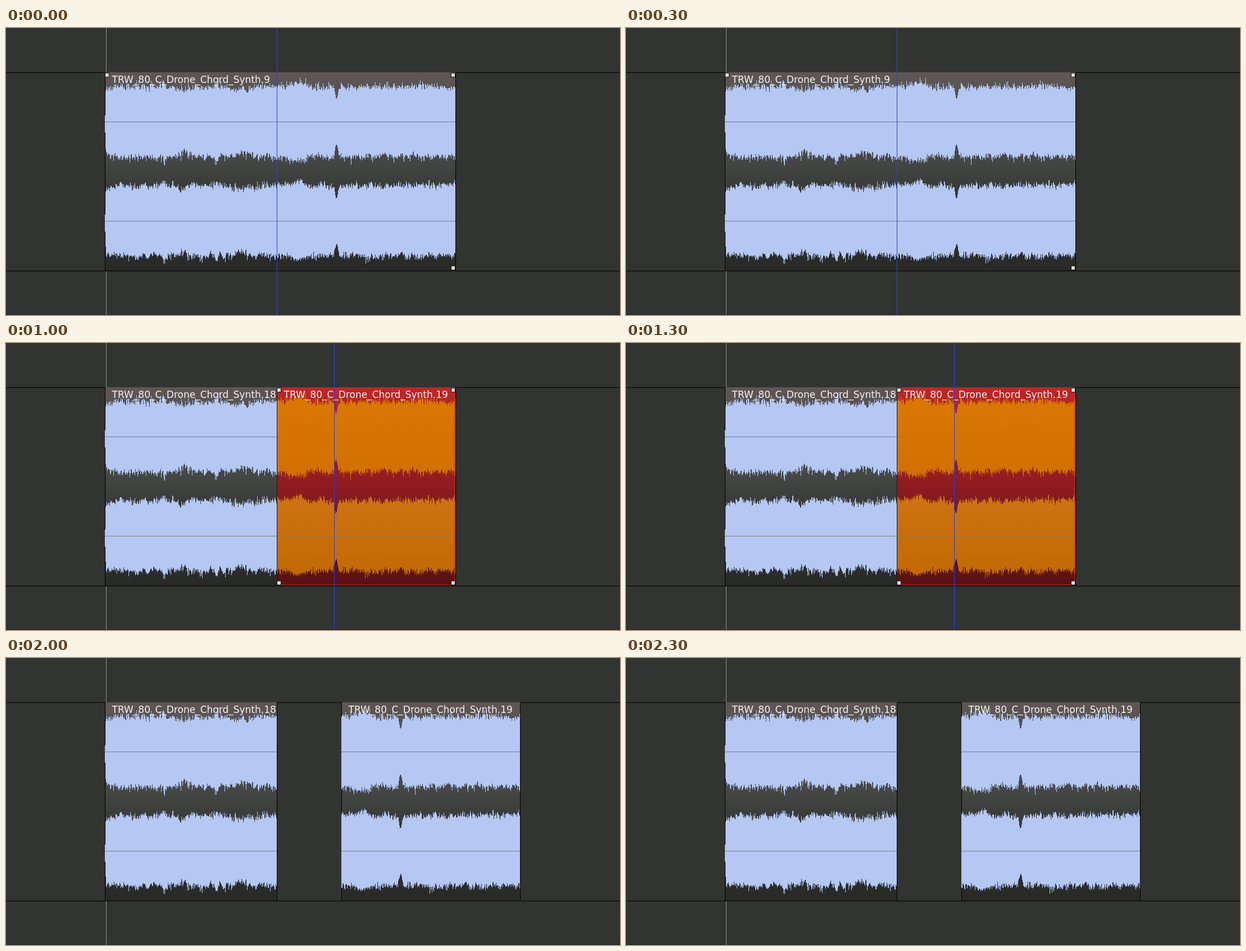
Write an HTML page with a canvas that moves like this. It is 1093x512 px and loops after 2.5 s.

```html
<!DOCTYPE html>
<html lang="en">
<head>
<meta charset="utf-8">
<title>Splitting an audio region</title>
<style>
html, body { margin: 0; width: 100%; height: 100%; overflow: hidden; background: #323431; }
canvas { display: block; }
</style>
</head>
<body>
<canvas id="stage" width="1093" height="512"></canvas>
<script>
const W = 1093, H = 512, TOP = 79, BOTTOM = 433;
const STEP = 500, LENGTH = 627, SPLIT = 307;
const CENTERS = [167, 344];
const ctx = document.getElementById('stage').getContext('2d');

const PLAIN = {
  body: [[0, '#5e5655'], [0.1, '#585453'], [0.42, '#474946'], [0.56, '#3b3d3a'], [1, '#282927']],
  wave: [[0, '#b5c7f3']],
  tip: 'rgba(10, 12, 18, 0.75)',
  axes: ['#6c7a9c', '#7b8079']
};
const PICKED = {
  body: [[0, '#c02626'], [0.43, '#961d21'], [0.57, '#841a1e'], [1, '#581212']],
  wave: [[0, '#db7805'], [0.43, '#d17100'], [0.57, '#ce7213'], [1, '#bf6900']],
  tip: 'rgba(90, 16, 10, 0.6)',
  axes: ['#c66f08', '#a07f42']
};

// Swells and dips of the sound
const BUMPS = [
  { at: 104, size: 9, spread: 3 },
  { at: 140, size: -7, spread: 10 },
  { at: 198, size: 10, spread: 3 },
  { at: 242, size: -6, spread: 24 },
  { at: 342, size: 7, spread: 18 },
  { at: 412, size: -22, spread: 3.5 }
];

function random(n) {
  n = Math.imul(n ^ (n >>> 16), 0x45d9f3b);
  n = Math.imul(n ^ (n >>> 16), 0x45d9f3b);
  return ((n ^ (n >>> 16)) >>> 0) / 4294967296;
}

// Value between -1 and 1, one per position and layer
const noise = (x, layer) => random(x * 64 + layer + 9001) * 2 - 1;

// How far the wave extends from its axis
function reach(x, edge) {
  if (x === 0) return edge % 2 ? 20 : 12;
  const swell = BUMPS.reduce((sum, b) => sum + b.size * Math.exp(-(((x - b.at) / b.spread) ** 2)), 0);
  const rough = 2.5 * noise(x >> 3, edge) + 3 * noise(x >> 1, edge + 8) + 4 * noise(x, edge + 16);
  const spike = Math.max(0, noise(x, edge + 24) - 0.55) * 18;
  const onset = -10 * Math.exp(-x / 7);
  const calm = swell < -10 ? 0.3 : 1;
  return Math.round(63 + swell + onset + calm * (rough + spike));
}

const SOUND = Array.from({ length: LENGTH }, (_, x) => [0, 1, 2, 3].map(edge => reach(x, edge)));

function rect(x, y, w, h, color) {
  ctx.fillStyle = color;
  ctx.fillRect(x, y, w, h);
}

function gradient(stops) {
  const g = ctx.createLinearGradient(0, TOP, 0, BOTTOM);
  stops.forEach(([at, color]) => g.addColorStop(at, color));
  return g;
}

function drawWave(x, width, from, skin) {
  const fill = gradient(skin.wave);
  CENTERS.forEach((mid, c) => {
    for (let i = 0; i < width; i++) {
      const [up, down] = SOUND[from + i].slice(c * 2);
      rect(x + i, mid - up, 1, up + down, fill);
      rect(x + i, mid - up, 1, 1, skin.tip);
      rect(x + i, mid + down - 1, 1, 1, skin.tip);
    }
    rect(x, mid, width, 1, skin.axes[c]);
  });
}

function drawHandle(x, y) {
  rect(x, y, 8, 8, '#1c1c1c');
  rect(x + 1, y + 1, 6, 6, '#dadad6');
}

function drawClip({ x, width, from = 0, take, picked }) {
  const skin = picked ? PICKED : PLAIN;
  const height = BOTTOM - TOP;
  rect(x, TOP, width, height, gradient(skin.body));
  rect(x, TOP, 1, height, '#000');
  drawWave(x, width, from, skin);
  rect(x + width, TOP, 1, height, '#000');
  if (picked) {
    rect(x, TOP, 1, height, '#3a0c0c');
    rect(x + width - 2, TOP, 1, height, '#c8281e');
    rect(x, BOTTOM - 2, width, 1, '#b0241f');
  }
  ctx.save();
  ctx.beginPath();
  ctx.rect(x, TOP, width, height);
  ctx.clip();
  ctx.font = '17px "DejaVu Sans", sans-serif';
  ctx.fillStyle = '#f4f4f2';
  ctx.fillText('TRW_80_C_Drone_Chord_Synth.' + take, x + 12.5, 98);
  ctx.restore();
}

function drawHandles({ x, width }, corners) {
  const spots = {
    topLeft: [x, TOP + 1],
    topRight: [x + width - 8, TOP + 1],
    bottomLeft: [x, BOTTOM - 9],
    bottomRight: [x + width - 8, BOTTOM - 9]
  };
  corners.forEach(name => drawHandle(...spots[name]));
}

const CORNERS = ['topLeft', 'topRight', 'bottomLeft', 'bottomRight'];
const whole = { x: 176, width: 624, take: 9 };
const left = { x: 176, width: 306, take: 18 };
const right = { x: 482, width: 318, from: SPLIT, take: 19 };
const picked = { ...right, picked: true };
const moved = { ...right, x: 597 };
const dragged = { ...moved, picked: true };

const SCENES = [
  { clips: [whole], held: whole, corners: CORNERS.filter(name => name !== 'bottomLeft'), head: 482 },
  { clips: [left, right], head: 482 },
  { clips: [left, picked], held: picked, corners: CORNERS, head: 584 },
  { clips: [left, dragged], held: dragged, corners: CORNERS, head: 597, headColor: '#403f86' },
  { clips: [left, moved] }
];

function draw({ clips, held, corners, head, headColor = '#2440f0' }) {
  rect(0, 0, W, H, '#323431');
  rect(0, H - 1, W, 1, '#242624');
  rect(178, 0, 1, H, '#90928f');
  rect(0, TOP, W, 1, '#000');
  rect(0, BOTTOM, W, 1, '#000');
  clips.forEach(drawClip);
  if (head) rect(head, 0, 1, H, headColor);
  if (held) drawHandles(held, corners);
}

let shown = -1;
const start = performance.now();

function tick() {
  const index = Math.floor((performance.now() - start) / STEP) % SCENES.length;
  if (index !== shown) draw(SCENES[shown = index]);
  requestAnimationFrame(tick);
}
tick();
</script>
</body>
</html>
```
